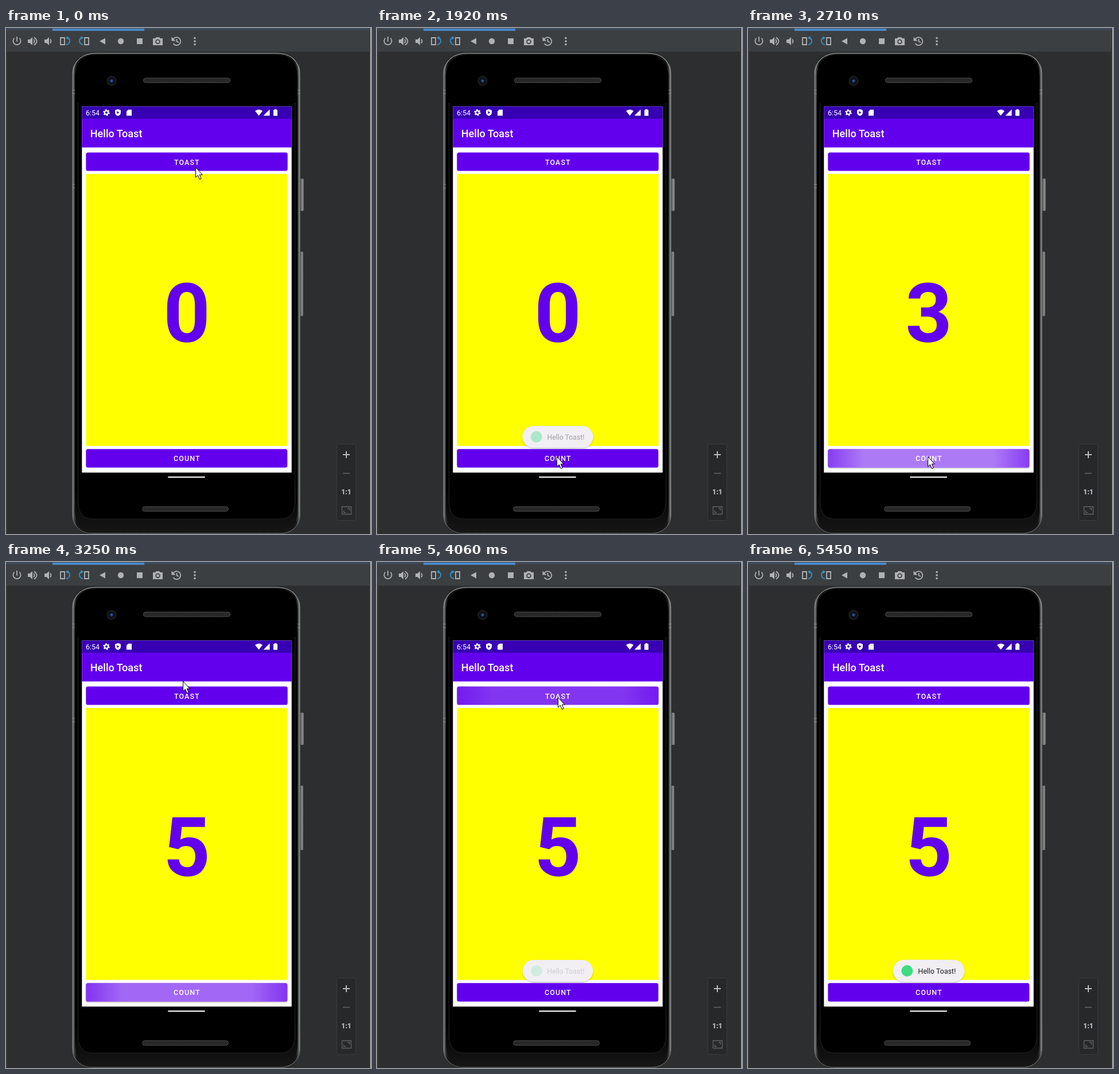
These frames come from a looping animation (636 by 880 pixels, 5.7 s). An HTML page:

```html
<!DOCTYPE html>
<html lang="en">
<head>
<meta charset="utf-8">
<title>Hello Toast</title>
<style>
html, body { margin: 0; width: 100%; height: 100%; overflow: hidden; background: #2d2e30; }
svg { display: block; width: 636px; height: 880px; }
text { font-family: Roboto, sans-serif; fill: #fff; }
.label { font-size: 12.45px; font-weight: 500; letter-spacing: 1.11px; }
.icons { fill: #afb1b3; }
.line { fill: none; stroke: #afb1b3; stroke-width: 1.8; }
.blue { fill: none; stroke: #3592c4; stroke-width: 1.8; }
</style>
</head>
<body>
<svg viewBox="0 0 636 880">
  <defs>
    <linearGradient id="rim" x1="0" x2="1" y1="0" y2="0">
      <stop offset="0" stop-color="#4b4c4c"/>
      <stop offset=".004" stop-color="#7d7f7f"/>
      <stop offset=".011" stop-color="#3a3b3b"/>
      <stop offset=".02" stop-color="#161616"/>
      <stop offset=".98" stop-color="#161616"/>
      <stop offset=".989" stop-color="#3a3b3b"/>
      <stop offset=".996" stop-color="#858787"/>
      <stop offset="1" stop-color="#4b4c4c"/>
    </linearGradient>
    <linearGradient id="key" x1="0" x2="1" y1="0" y2="0">
      <stop offset="0" stop-color="#333"/>
      <stop offset=".7" stop-color="#8f9191"/>
      <stop offset="1" stop-color="#5c5e5e"/>
    </linearGradient>
    <linearGradient id="lip" x1="0" x2="0" y1="0" y2="1">
      <stop offset=".9" stop-color="#000"/>
      <stop offset="1" stop-color="#161616"/>
    </linearGradient>
    <linearGradient id="glow" x1="0" x2="1" y1="0" y2="0">
      <stop offset="0" stop-color="#fff" stop-opacity=".5"/>
      <stop offset=".18" stop-color="#fff"/>
      <stop offset=".82" stop-color="#fff"/>
      <stop offset="1" stop-color="#fff" stop-opacity=".5"/>
    </linearGradient>
    <radialGradient id="lens">
      <stop offset="0" stop-color="#5c7fc8"/>
      <stop offset=".22" stop-color="#22376b"/>
      <stop offset=".45" stop-color="#0c0f18"/>
      <stop offset=".75" stop-color="#111215"/>
      <stop offset="1" stop-color="#2a2b2d"/>
    </radialGradient>
    <pattern id="mesh" width="3" height="4" patternUnits="userSpaceOnUse">
      <rect width="3" height="4" fill="#080808"/>
      <path d="M0 0L1.5 2L0 4M3 0L1.5 2L3 4" fill="none" stroke="#555" stroke-width=".7"/>
    </pattern>
    <filter id="shade" x="-10%" y="-20%" width="120%" height="150%">
      <feDropShadow dx="0" dy="1" stdDeviation="1" flood-color="#000" flood-opacity=".3"/>
    </filter>
  </defs>

  <!-- window -->
  <rect width="636" height="880" fill="#2d2e30"/>
  <rect width="636" height="41" fill="#3c3f41"/>
  <rect width="636" height="4" fill="#3d4855"/>
  <rect x="81" y="1" width="160" height="4" fill="#4a88c7"/>
  <path d="M.5 5V880M634 5V880" stroke="#3c3f41" stroke-width="2"/>
  <rect x="635" width="1" height="880" fill="#d8d9da"/>

  <!-- toolbar -->
  <g class="icons">
    <path class="line" d="M14.6 17.6A6.6 6.6 0 1 0 23.4 17.6M19 15V23.5"/>
    <path d="M38 20H41.5L46 16V30L41.5 26H38ZM67 20H70.5L75 16V30L70.5 26H67Z"/>
    <path class="line" d="M48 19.5Q51 23 48 26.5M49 16.2Q58 23 49 29.8M77 19.5Q80 23 77 26.5"/>
    <path class="line" d="M95 17H102V29H95ZM137 17H144V29H137Z"/>
    <path class="blue" d="M105 17Q111 17 111 22Q111 28 105 29M134 17Q128 17 128 22Q128 28 134 29"/>
    <path fill="#3592c4" d="M108.500 14V20.500L104 17ZM130.500 14V20.500L135 17Z"/>
    <path d="M163 23L173 17.500V28.500Z"/>
    <circle cx="200" cy="23" r="5.2"/>
    <rect x="228" y="18" width="10" height="10"/>
    <path fill-rule="evenodd" d="M256 18H260L262 16H267L269 18H273V30H256ZM264.500 19.600a4.200 4.200 0 1 0 .01 0Z"/>
    <circle cx="264.500" cy="23.800" r="2.500"/>
    <path class="line" d="M291 20A7 7 0 1 1 291.500 27M297.500 19V23.500L301 25"/>
    <path d="M288.500 15.500V22.500H295.500Z"/>
    <circle cx="329" cy="17.500" r="1.800"/><circle cx="329" cy="23" r="1.800"/><circle cx="329" cy="28.500" r="1.800"/>
  </g>

  <!-- zoom panel -->
  <rect x="576.500" y="723.500" width="33" height="133" rx="3" fill="#27282a" stroke="#3b3c3e"/>
  <path d="M587 742H599M593 736V748" stroke="#b8babc" stroke-width="2"/>
  <path d="M587 774.500H599" stroke="#5c5e60" stroke-width="1.800"/>
  <text x="593" y="810.500" text-anchor="middle" style="font-size:12px;font-weight:900;fill:#b8babc">1:1</text>
  <path d="M585.500 832.500H601.500V845.500H585.500ZM588.500 839V842.500H592M595 835.500H598.500V839" fill="none" stroke="#606264" stroke-width="1.300"/>

  <!-- phone -->
  <rect x="511" y="262" width="8" height="56" rx="2" fill="url(#key)"/>
  <rect x="511" y="389" width="7" height="112" rx="2" fill="url(#key)"/>
  <path d="M115 83Q115 43 157 43H472Q513 43 513 83V846Q511 880 476 880H152Q117 880 115 846Z" fill="url(#rim)"/>
  <path d="M120 84Q121 47 158 47H471Q507 47 508 84V842Q505 877 474 877H154Q123 877 120 842Z" fill="url(#lip)"/>
  <path d="M116.500 80Q119 44 158 44H471Q509 44 511.500 80" fill="none" stroke="#858787" stroke-width="1.600"/>
  <path d="M116 850Q121 879 152 879H476Q507 879 512 850" fill="none" stroke="#626464" stroke-width="1.300"/>
  <path d="M126 85Q128 51 160 51H469Q501 51 503 85V826Q502 854 478 854H151Q127 854 126 826Z" fill="#000"/>
  <path d="M125.500 130V826Q127 854 151 854H478Q502 854 503.500 826V130" fill="none" stroke="#262626"/>
  <path d="M115 108H120M115 114H120M115 272H120M115 278H120M508 108H513M508 114H513" stroke="#8b8d8d"/>
  <circle cx="184" cy="92" r="8.500" fill="url(#lens)"/>
  <rect x="239.500" y="87" width="151" height="8" rx="4" fill="url(#mesh)" stroke="#4c4c4c"/>
  <rect x="237.500" y="832.500" width="150" height="8" rx="4" fill="url(#mesh)" stroke="#4c4c4c"/>
  <rect x="282" y="780" width="65" height="2.200" rx="1.100" fill="#eee"/>

  <!-- screen -->
  <rect x="132.300" y="136.400" width="365.400" height="636.800" fill="#fff"/>
  <rect x="132.300" y="136.400" width="365.400" height="22" fill="#3700b3"/>
  <rect x="132.300" y="157.800" width="365.400" height="49.900" fill="#6200ee"/>
  <text x="139" y="152" font-size="12.450">6:54</text>
  <text x="146.700" y="189.700" font-size="18.100" font-weight="500">Hello Toast</text>
  <g fill="#fff">
    <circle cx="175" cy="147" r="3.200" fill="none" stroke="#fff" stroke-width="2.200"/>
    <circle cx="175" cy="147" r="5" fill="none" stroke="#fff" stroke-width="1.600" stroke-dasharray="2.600 2.636"/>
    <path fill-rule="evenodd" d="M195 141L200 143V147Q200 151.500 195 153Q190 151.500 190 147V143ZM193.300 144.500V149.300L197.500 147Z"/>
    <path d="M213 142H219V152.500H210V145Z"/>
    <path d="M434 144.300Q440.500 139.300 447 144.300L440.500 152.500Z"/>
    <path d="M459.500 141.500V152.500H448.500Z"/>
    <path d="M466 142.500H467.700V141.300H471.300V142.500H473V152.800H466Z"/>
  </g>
  <rect x="139.400" y="253.800" width="351.400" height="473" fill="#ff0"/>
  <text id="digit" x="315" y="546.200" text-anchor="middle" style="font-size:142.300px;font-weight:700;fill:#6200ee">0</text>

  <g id="top">
    <rect x="139.300" y="216.400" width="351.400" height="32.200" rx="3.600" fill="#6200ee"/>
    <rect class="wave" x="139.300" y="216.400" width="351.400" height="32.200" rx="3.600" fill="url(#glow)"/>
    <text class="label" x="293" y="237.500">TOAST</text>
  </g>
  <g id="low">
    <rect x="139.300" y="732.200" width="351" height="32.300" rx="3.600" fill="#6200ee"/>
    <rect class="wave" x="139.300" y="732.200" width="351" height="32.300" rx="3.600" fill="url(#glow)"/>
    <text class="label" x="292" y="752.800">COUNT</text>
  </g>

  <g id="toast" visibility="hidden">
    <rect x="252.700" y="691.700" width="124.800" height="38.600" rx="19.300" fill="#f1eff4" filter="url(#shade)"/>
    <g id="note">
      <circle cx="277.300" cy="711" r="10" fill="#3ddc84"/>
      <text x="296.300" y="716" style="font-size:12.450px;fill:#1c1b1f">Hello Toast!</text>
    </g>
  </g>

  <path id="arrow" d="M.5 .5V17.800L4.400 14.200L7.400 21.200L10.200 20L7.200 13.200H12.200Z" fill="#fff" stroke="#000" stroke-linejoin="round"/>
</svg>
<script>
const LOOP = 5700;
const FADE = 220;
const $ = id => document.getElementById(id);
const clamp = (v, lo = 0, hi = 1) => Math.min(hi, Math.max(lo, v));

// pointer glides: start, end, x, y
const home = { x: 330, y: 242 };
const glides = [
  [250, 660, 209, 832],
  [930, 1420, 313, 745],
  [3130, 3250, 308, 207],
  [3250, 3370, 310, 167],
  [3370, 3490, 315, 235],
  [4570, 4840, 301, 79],
  [4840, 5200, 498, 817],
  [5200, 5450, 508, 900]
];

function pointer(t) {
  let { x, y } = home;
  for (const [from, to, toX, toY] of glides) {
    const u = clamp((t - from) / (to - from)) ** 2;
    x += (toX - x) * u;
    y += (toY - y) * u;
  }
  return `translate(${x} ${y})`;
}

// five taps at an even pace
const taps = t => clamp(Math.floor((t - 2200) / 240) + 1, 0, 5);

// ripple brightens while pressed, then fades after release
function glow(t, press, rise, release, fall) {
  return Math.min(clamp((t - press) / rise), clamp(1 - (t - release) / fall));
}

const popup = (t, from, to) => clamp(Math.min(t - from, to - t) / FADE);

function wave(id, level) {
  const button = $(id);
  button.querySelector('.wave').setAttribute('opacity', level);
  button.setAttribute('filter', level > .25 ? 'url(#shade)' : 'none');
}

function draw(t) {
  $('arrow').setAttribute('transform', pointer(t));
  $('digit').textContent = taps(t);
  wave('low', .48 * glow(t, 2150, 500, 3130, 810));
  wave('top', .21 * glow(t, 3880, 150, 4110, 460));

  const show = Math.max(popup(t, 490, 2005), popup(t, 4025, LOOP + FADE));
  const size = .98 + .02 * show;
  $('toast').setAttribute('visibility', show ? 'visible' : 'hidden');
  $('toast').setAttribute('transform', `translate(315 711) scale(${size}) translate(-315 -711)`);
  $('note').setAttribute('opacity', show);
}

const start = performance.now();
function tick() {
  draw((performance.now() - start) % LOOP);
  requestAnimationFrame(tick);
}
tick();
</script>
</body>
</html>
```
